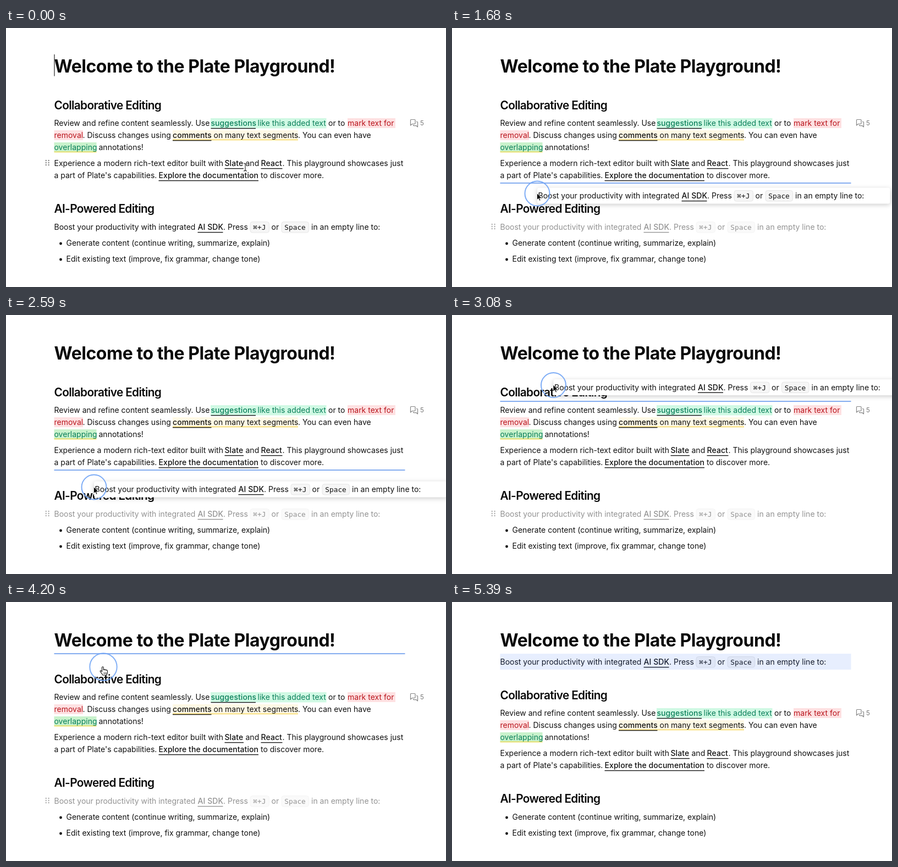
Recreate the animation shown at these times as an HTML page. Size 800 px wide and 471 px high, loop 5.81 s.

```html
<!DOCTYPE html>
<html lang="en">
<head>
<meta charset="utf-8">
<title>Block drag and drop</title>
<style>
  html, body { margin: 0; width: 100%; height: 100%; overflow: hidden; background: #fff; }
  svg { display: block; width: 800px; height: 471px; }
  text { font: 14px Inter, sans-serif; font-optical-sizing: none; fill: #111; }
  .h1 { font-size: 32px; font-weight: 700; letter-spacing: -.46px; fill: #0a0a0a; }
  .h2 { font-size: 20.8px; font-weight: 600; letter-spacing: -.64px; fill: #0a0a0a; }
  .link { font-weight: 500; letter-spacing: .07px; }
  .add { fill: #0a7f5a; }
  .del { fill: #b9151d; }
  .code { font: 12.8px "DejaVu Sans Mono", monospace; }
  .count { font-size: 11.5px; fill: #777; }
  .tip { font-size: 11px; fill: #fff; text-anchor: middle; }
  #previewBox { fill: #fff; filter: drop-shadow(0 2px 4px rgba(0, 0, 0, .2)); }
</style>
</head>
<body>
<svg viewBox="0 0 800 471">
  <g id="title"></g>
  <g id="middle">
    <g fill="none" stroke="#858585" stroke-width="1.2" stroke-linejoin="round">
      <path d="M744 173.500a1 1 0 0 1-1 1h-4.500l-3 2.500v-9.500a1 1 0 0 1 1-1h6.500a1 1 0 0 1 1 1z"/>
      <path d="M746 170.500h1.500a1 1 0 0 1 1 1v8.500l-2.500-2.300h-4.500a1 1 0 0 1-1-1v-.700"/>
    </g>
  </g>
  <g id="source"><g id="boost"></g></g>
  <g id="bullets"></g>
  <rect id="selection" x="87.500" y="94" width="638" height="29" fill="rgba(50,110,240,.115)"/>
  <rect id="dropLine" x="87.500" width="638" height="2" fill="#85adf0"/>
  <rect id="hover" x="68" y="353" width="14" height="18" rx="3" fill="#f1f1f1"/>
  <g id="handle" fill="#858585"></g>
  <path id="caret" d="M88 48V87.500" stroke="#222" stroke-width="1.200"/>
  <g id="preview">
    <rect id="previewBox" x="86" y="347.500" width="641.500" height="29" rx="4"/>
    <use href="#boost"/>
  </g>
  <g id="tooltip">
    <rect x="30" y="320" width="91" height="26" rx="6" fill="#18181b"/>
    <text class="tip" x="75.500" y="337">Drag to move</text>
  </g>
  <circle id="ring" fill="none" stroke="#6fa4f5" stroke-width="2"/>
  <g id="cursor" stroke-linejoin="round">
    <g id="ibeam" fill="none">
      <path d="M-3-7q3 0 3 2V5q0 2-3 2M3-7q-3 0-3 2M3 7q-3 0-3-2" stroke="#fff" stroke-width="2.600"/>
      <path d="M-3-7q3 0 3 2V5q0 2-3 2M3-7q-3 0-3 2M3 7q-3 0-3-2" stroke="#222" stroke-width="1.100"/>
    </g>
    <path id="arrow" d="M-.5-.5V11.500l2.800-2.500 1.800 4.200 1.900-.8-1.800-4.100h3.900z" fill="#000" stroke="#fff" stroke-width=".8"/>
    <g id="hand" fill="#fff" stroke="#111" stroke-width="1.100">
      <path d="M-2.500 1.200c0-2 2.800-2 2.800 0v4.300c.2-1.300 2.500-1.200 2.600.2.300-1 2.300-.8 2.400.5.400-.8 2.100-.6 2.100.9v3.400c0 2-1.300 2.600-1.300 4.500h-7.200c-.4-2.200-3.600-4.400-4.600-6.700-.5-1.500 1.200-2 2-1l1.200 1.400z"/>
      <path d="M1.200 10v3M3.200 10v3M5.200 10v3" stroke-width=".8"/>
    </g>
  </g>
</svg>
<script>
const $ = id => document.getElementById(id);
const LEFT = 87.5;

function add(parent, tag, attrs, content = '') {
  const node = document.createElementNS('http://www.w3.org/2000/svg', tag);
  for (const key in attrs) node.setAttribute(key, attrs[key]);
  node.textContent = content;
  $(parent).append(node);
  return node;
}
const write = (parent, x, y, content, style = '') =>
  add(parent, 'text', { x, y, class: style }, content);
const box = (parent, x, y, right, height, fill) =>
  add(parent, 'rect', { x, y, width: right - x, height, fill });
function link(parent, x, y, right, content, style = '') {
  write(parent, x, y, content, 'link ' + style);
  box(parent, x, y + 3.9, right, 1.4, '#1a1a1a');
}
function chip(x, right, content) {
  add('boost', 'rect', { x, y: 352.5, width: right - x, height: 19.5, rx: 4, fill: '#f6f6f6', stroke: '#e6e6e6' });
  write('boost', x + 5.3, 367, content, 'code');
}

write('title', LEFT, 81, 'Welcome to the Plate Playground!', 'h1');

// Highlight backgrounds
box('middle', 372, 164, 582.5, 18.5, '#d0f9e4');
box('middle', 621, 164, 708, 18, '#fee1e2');
box('middle', LEFT, 186, 140, 18, '#fee1e2');
box('middle', 303, 186, 531, 17, '#fff9e5');
box('middle', 303, 202.5, 531, 1.8, '#f8dc72');
box('middle', LEFT, 208, 164.5, 17, '#c9f2cc');
box('middle', LEFT, 224.5, 164.5, 1.8, '#e8dc62');

write('middle', LEFT, 147.5, 'Collaborative Editing', 'h2');
write('middle', LEFT, 178, 'Review and refine content seamlessly. Use');
link('middle', 372.5, 178, 454, 'suggestions', 'add');
write('middle', 457.5, 178, 'like this added text', 'add');
write('middle', 586, 178, 'or to');
write('middle', 621, 178, 'mark text for', 'del');
write('middle', 753, 177, '5', 'count');
write('middle', LEFT, 200, 'removal', 'del');
write('middle', 139.5, 200, '. Discuss changes using');
link('middle', 303, 200, 373.5, 'comments');
write('middle', 377.5, 200, 'on many text segments');
write('middle', 531, 200, '. You can even have');
write('middle', LEFT, 222, 'overlapping', 'add');
write('middle', 168.5, 222, 'annotations!');
write('middle', LEFT, 251, 'Experience a modern rich-text editor built with');
link('middle', 397.5, 251, 432, 'Slate');
write('middle', 435.5, 251, 'and');
link('middle', 463.5, 251, 502.5, 'React');
write('middle', 502.5, 251, '. This playground showcases just');
write('middle', LEFT, 273, "a part of Plate's capabilities.");
link('middle', 277.5, 273, 459, 'Explore the documentation');
write('middle', 463, 273, 'to discover more.');
write('middle', LEFT, 336, 'AI-Powered Editing', 'h2');

write('boost', LEFT, 367, 'Boost your productivity with integrated');
link('boost', 348.5, 367, 394.5, 'AI SDK');
write('boost', 395, 367, '. Press');
chip(444, 478.5, '⌘+J');
write('boost', 482.5, 367, 'or');
chip(501, 550.5, 'Space');
write('boost', 555, 367, 'in an empty line to:');

['Generate content (continue writing, summarize, explain)',
 'Edit existing text (improve, fix grammar, change tone)'].forEach((item, i) => {
  add('bullets', 'circle', { cx: 99.5, cy: 392 + 29 * i, r: 2.4, fill: '#111' });
  write('bullets', 109.5, 396 + 29 * i, item);
});

for (let i = 0; i < 6; i++)
  add('handle', 'circle', { cx: 72.8 + 4.8 * (i % 2), cy: 4 * (i >> 1) - 4, r: 1.2 });

const LOOP = 5810, STEP = 70;
const PRESS = 1330, DRAG = 1400, RELEASE = 4200, DROP = 4340;
const PATH = [ // time, x, y
  [0, 435, 253], [770, 74, 358], [1330, 74, 358], [1680, 155, 301], [2100, 155, 301],
  [2590, 160, 313], [3080, 184.5, 127.5], [3430, 184.5, 127], [4060, 177, 118], [LOOP, 177, 118]
];
const EDGES = [94, 157, 231, 282, 346];

function pointer(t) {
  const i = PATH.findIndex(p => p[0] > t);
  const [t0, x0, y0] = PATH[i - 1], [t1, x1, y1] = PATH[i];
  const u = (t - t0) / (t1 - t0), k = u * u * (3 - 2 * u);
  return [x0 + (x1 - x0) * k, y0 + (y1 - y0) * k];
}
const show = (id, on) => $(id).style.display = on ? '' : 'none';
const move = (id, x, y) => $(id).setAttribute('transform', `translate(${x} ${y})`);

function render(t) {
  const [x, y] = pointer(t);
  const dragging = t >= DRAG && t < RELEASE;
  const dropped = t >= DROP;
  const onHandle = x < 85 && t < DRAG;

  move('middle', 0, dropped ? 29 : 0);
  move('source', 0, dropped ? -253 : 0);
  $('source').setAttribute('opacity', t >= DRAG && !dropped ? .45 : 1);
  show('selection', dropped);
  show('caret', t < 350 || (t >= 840 && t < 1260));

  const edge = EDGES.reduce((a, b) => Math.abs(b - y) < Math.abs(a - y) ? b : a);
  show('dropLine', t >= DRAG && !dropped && edge !== 346);
  $('dropLine').setAttribute('y', edge - 1);

  show('handle', !dropped);
  move('handle', 0, t >= DRAG || y >= 346 ? 361 : y >= 283 ? 328 : 245);
  $('handle').setAttribute('opacity', t >= DRAG ? .65 : 1);
  show('hover', onHandle && y >= 346);
  show('tooltip', t >= 840 && t < PRESS);

  show('preview', dragging);
  move('preview', x - 86, y - 358);

  const spread = Math.max(0, t - RELEASE + STEP) / STEP;
  show('ring', t >= PRESS && !dropped);
  $('ring').setAttribute('cx', x);
  $('ring').setAttribute('cy', y);
  $('ring').setAttribute('r', 22.5 + (t >= RELEASE ? 2.2 * spread : 0));
  $('ring').setAttribute('opacity', t >= RELEASE ? 1.1 - .25 * spread : .9);

  show('cursor', !dropped);
  move('cursor', x, y);
  show('arrow', dragging);
  show('hand', onHandle || t >= RELEASE);
  show('ibeam', !onHandle && t < DRAG);
}

function tick() {
  const t = performance.now() % LOOP;
  render(Math.floor(t / STEP) * STEP);
  requestAnimationFrame(tick);
}
tick();
</script>
</body>
</html>
```
